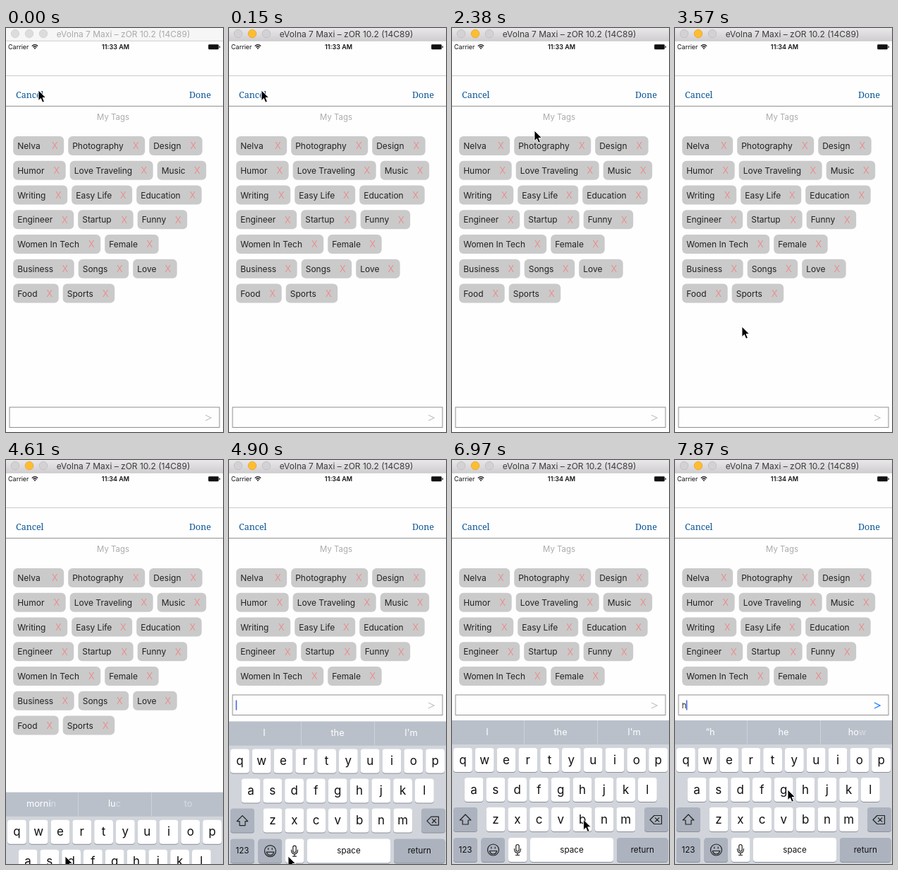
Animation of 308x571 px, one loop 8000 ms. Source, as an HTML page:

```html
<!DOCTYPE html>
<html lang="en">
<head>
<meta charset="utf-8">
<title>Tag editor</title>
<style>
  html, body { margin: 0; width: 100%; height: 100%; overflow: hidden; background: #fefefe; }
  svg { display: block; width: 308px; height: 571px; }
  text { font-family: Inter, "Open Sans", sans-serif; font-size: 12px; fill: #222; white-space: pre; }
  .mid { text-anchor: middle; }
  .link { font: 12.5px "Noto Serif", serif; fill: #0b5596; }
  .status { font-size: 9px; fill: #111; }
  .remove { font-size: 13px; font-weight: 300; fill: #f47f7f; }
  .letter { font-size: 17px; fill: #111; }
  .label { font-size: 11.7px; fill: #111; }
  .guess { font-size: 12.8px; fill: #fff; }
  .icon { fill: none; stroke: #222; stroke-width: 1.2; stroke-linejoin: round; stroke-linecap: round; }
</style>
</head>
<body>
<svg viewBox="0 0 308 571">
  <defs>
    <linearGradient id="bar" x2="0" y2="1">
      <stop stop-color="#e9e7e9"/><stop offset="1" stop-color="#d0ced0"/>
    </linearGradient>
  </defs>
  <rect width="308" height="571" fill="#fefefe"/>

  <g id="window">
    <rect id="titleBar" width="308" height="18"/>
    <path d="M0 18.3H308" stroke="#c4c4c4" stroke-width=".8"/>
    <g stroke-width=".7">
      <circle class="dot" cx="13" cy="8" r="5.8"/>
      <circle class="dot" id="amber" cx="33" cy="8" r="5.8"/>
      <circle class="dot" cx="53" cy="8" r="5.8"/>
    </g>
    <text id="title" class="mid" x="166.5" y="12.8">eVolna 7 Maxi – zOR 10.2 (14C89)</text>
  </g>

  <text class="status" x="3" y="30">Carrier</text>
  <g fill="none" stroke="#111" stroke-width="1.3">
    <path d="M36.8 25.4Q41 21.8 45.2 25.4M38.4 27.3Q41 25.2 43.6 27.3"/>
    <path d="M41 30.2L39.7 28.6Q41 27.6 42.3 28.6Z" fill="#111" stroke="none"/>
  </g>
  <text id="clock" class="status mid" x="155.5" y="30" font-weight="600"></text>
  <rect x="287.4" y="23.4" width="14.2" height="6.6" rx="1.2" fill="#111" stroke="#111" stroke-width=".6"/>
  <path d="M303.2 25.4V28" stroke="#111" stroke-width="1.2"/>
  <path d="M0 67.5H308" stroke="#cbcbcb"/>

  <text id="show" class="mid" x="154" y="122.8" style="font-size:10.6px">Show Tags</text>

  <g id="editor">
    <text class="link" x="14" y="99">Cancel</text>
    <text class="link" x="260" y="99">Done</text>
    <path d="M0 110.5H308" stroke="#929292"/>
    <text class="mid" x="152" y="130" style="font-size:11.4px;fill:#acacac">My Tags</text>
    <g id="tags"></g>
    <g id="field">
      <rect x="5" y=".5" width="298" height="28.5" fill="#fefefe" stroke="#8f8f8f"/>
      <path id="send" d="M283 11.5L291 15.5L283 19.5" fill="none" stroke-width="1.3"/>
      <text id="typed" x="9.8" y="19.3" style="font-size:11px">h</text>
      <rect id="caret" y="8" width="1.6" height="14" fill="#4268e0"/>
    </g>
  </g>

  <g id="keyboard">
    <rect width="308" height="240" fill="#d1d5db"/>
    <rect width="308" height="34" fill="#b9c0ca"/>
    <path d="M102.5 0V34M206.5 0V34" stroke="#cdd2d9"/>
    <g id="guesses"></g>
    <g id="keys"></g>
    <g class="icon">
      <path d="M19 133L11.2 141H15V147H23V141H26.8Z"/>
      <path d="M287 134.5H297.5V146.5H287L281 140.5ZM288.5 137.8L293.8 143.2M293.8 137.8L288.5 143.2"/>
      <circle cx="58.5" cy="183" r="8"/>
      <path d="M53.3 184.5H63.7Q62.5 189 58.5 189T53.3 184.5ZM55.8 179V181M61.2 179V181"/>
      <rect x="90.8" y="175.5" width="4.4" height="9.5" rx="2.2"/>
      <path d="M88.5 181.5Q88.5 187.3 93 187.3T97.5 181.5M93 187.3V190.5M90.5 190.5H95.5"/>
    </g>
  </g>

  <path id="pointer" d="M0 0V14.6L3.4 11.5L5.8 17.2L8.4 16.1L6 10.5H10.6Z" fill="#000" stroke="#fff" stroke-width=".9"/>
</svg>

<script>
const LOOP = 8000, TICK = 148.5;
const $ = id => document.getElementById(id);

function add(parent, name, attrs, content) {
  const el = document.createElementNS("http://www.w3.org/2000/svg", name);
  for (const key in attrs) el.setAttribute(key, attrs[key]);
  if (content) el.textContent = content;
  return parent.appendChild(el);
}

// Each tag is "name:chip width".
const tagRows = [
  "Nelva:72,Photography:109,Design:75.5",
  "Humor:74.5,Love Traveling:118,Music:69.5",
  "Writing:77,Easy Life:86,Education:92.5",
  "Engineer:86,Startup:78.5,Funny:70.5",
  "Women In Tech:124,Female:76.5",
  "Business:86.5,Songs:71.5,Love:62.5",
  "Food:64.5,Sports:73.5"
].map((row, i) => {
  const group = add($("tags"), "g", { transform: `translate(0 ${153 + i * 34.75})` });
  let x = 10.2;
  for (const tag of row.split(",")) {
    const [name, size] = tag.split(":"), width = +size;
    add(group, "rect", { x, width, height: 27, rx: 6, fill: "#cacaca" });
    add(group, "text", { x: x + 6, y: 18 }, name);
    add(group, "text", { x: x + width - 13, y: 18.4, class: "remove mid" }, "X");
    x += width + 6;
  }
  return group;
});

function addKey(x, y, width, text, cls = "letter", fill = "#fff") {
  add($("keys"), "rect", { x, y: y + 1, width, height: 34, rx: 4, fill: "#8a8f98" });
  add($("keys"), "rect", { x, y, width, height: 34, rx: 4, fill });
  const baseline = y + (cls === "letter" ? 22.6 : 20.6);
  add($("keys"), "text", { x: x + width / 2, y: baseline, class: cls + " mid" }, text);
}

const DARK = "#acb3bf";
[["qwertyuiop", 2], ["asdfghjkl", 17.6], ["zxcvbnm", 48.6]].forEach(([letters, left], row) =>
  [...letters].forEach((c, i) => addKey(left + i * 30.8, 39 + row * 42, 26.8, c)));
addKey(2, 123, 34, "", "label", DARK);
addKey(273, 123, 34, "", "label", DARK);
addKey(2, 166, 34, "123", "label", DARK);
addKey(41.5, 166, 33.5, "", "label", DARK);
addKey(80, 166, 26.5, "");
addKey(111, 166, 118, "space", "label");
addKey(234, 166, 72.5, "return", "label", DARK);

// Suggestions as [solid part, fading part].
const guessSets = [
  [["morni", "n"], ["lu", "c"], ["", "to"]],
  [["I", ""], ["the", ""], ["I'm", ""]],
  [["“h", ""], ["he", ""], ["ho", "w"]]
].map(set => {
  const group = add($("guesses"), "g");
  set.forEach(([solid, fading], i) => {
    const text = add(group, "text", { x: [50, 154, 258.5][i], y: 20.5, class: "guess mid" });
    add(text, "tspan", {}, solid);
    add(text, "tspan", { "fill-opacity": .45 }, fading);
  });
  return group;
});

const pointerPath = [
  [752, 46, 88], [1198, 142, 116], [1792, 142, 116], [2089, 202, 136], [2386, 117, 145],
  [2980, 30, 165], [3128, 30, 165], [3574, 95, 422], [3723, 95, 422], [4020, 145, 535],
  [4316, 84, 560], [5059, 84, 560], [5653, 212, 500], [6395, 192, 513], [6544, 192, 513],
  [6989, 184, 506], [7435, 186, 464], [7584, 186, 464], [7880, 160, 466]
];
const keyboardPath = [[4465, 203], [4613, 102], [4762, 18], [4910, 1.6], [5059, 0]];

function at(path, t) {
  const i = path.findIndex(p => p[0] >= t);
  if (i < 0) return path[path.length - 1].slice(1);
  if (i === 0) return path[0].slice(1);
  const a = path[i - 1], b = path[i], k = (t - a[0]) / (b[0] - a[0]);
  return a.slice(1).map((v, j) => v + (b[j + 1] - v) * k);
}

const show = (el, on) => el.setAttribute("visibility", on ? "inherit" : "hidden");
const move = (el, x, y) => el.setAttribute("transform", `translate(${x} ${y})`);

function render(time) {
  const t = Math.floor((time + 6) / TICK) * TICK + 10;

  const active = t >= 150;
  $("titleBar").setAttribute("fill", active ? "url(#bar)" : "#f6f6f6");
  $("title").style.fill = active ? "#3c3c3c" : "#aaa";
  document.querySelectorAll(".dot").forEach(dot => {
    const lit = active && dot.id === "amber";
    dot.setAttribute("fill", lit ? "#fdbd2f" : active ? "#d3d1d3" : "#dcdcdc");
    dot.setAttribute("stroke", lit ? "#e0a12a" : active ? "#bab8ba" : "#cecece");
  });
  $("clock").textContent = t < 2680 ? "11:33 AM" : "11:34 AM";

  const closed = t >= 750 && t < 1490;
  show($("editor"), !closed);
  show($("show"), closed);
  $("show").style.fill = t < 1340 ? "#0a7cff" : "#cce4ff";

  const editing = t >= 4900, filled = t >= 7570;
  tagRows.forEach((row, i) => show(row, i < 5 || !editing));
  move($("field"), 0, editing ? 331.5 : 535.5);
  show($("typed"), filled);
  show($("caret"), editing && (filled || (t - 4900) % 1000 < 550));
  $("caret").setAttribute("x", filled ? 15.8 : 9.6);
  $("send").setAttribute("stroke", filled ? "#0a7cff" : "#c4c4c4");

  move($("keyboard"), 0, 368 + at(keyboardPath, t)[0]);
  show($("keyboard"), t >= 4600);
  const guess = t < 4750 ? 0 : t < 7870 ? 1 : 2;
  guessSets.forEach((set, i) => show(set, i === guess));

  move($("pointer"), ...at(pointerPath, t));
}

const start = performance.now();
function frame() {
  render((performance.now() - start) % LOOP);
  requestAnimationFrame(frame);
}
frame();
</script>
</body>
</html>
```
